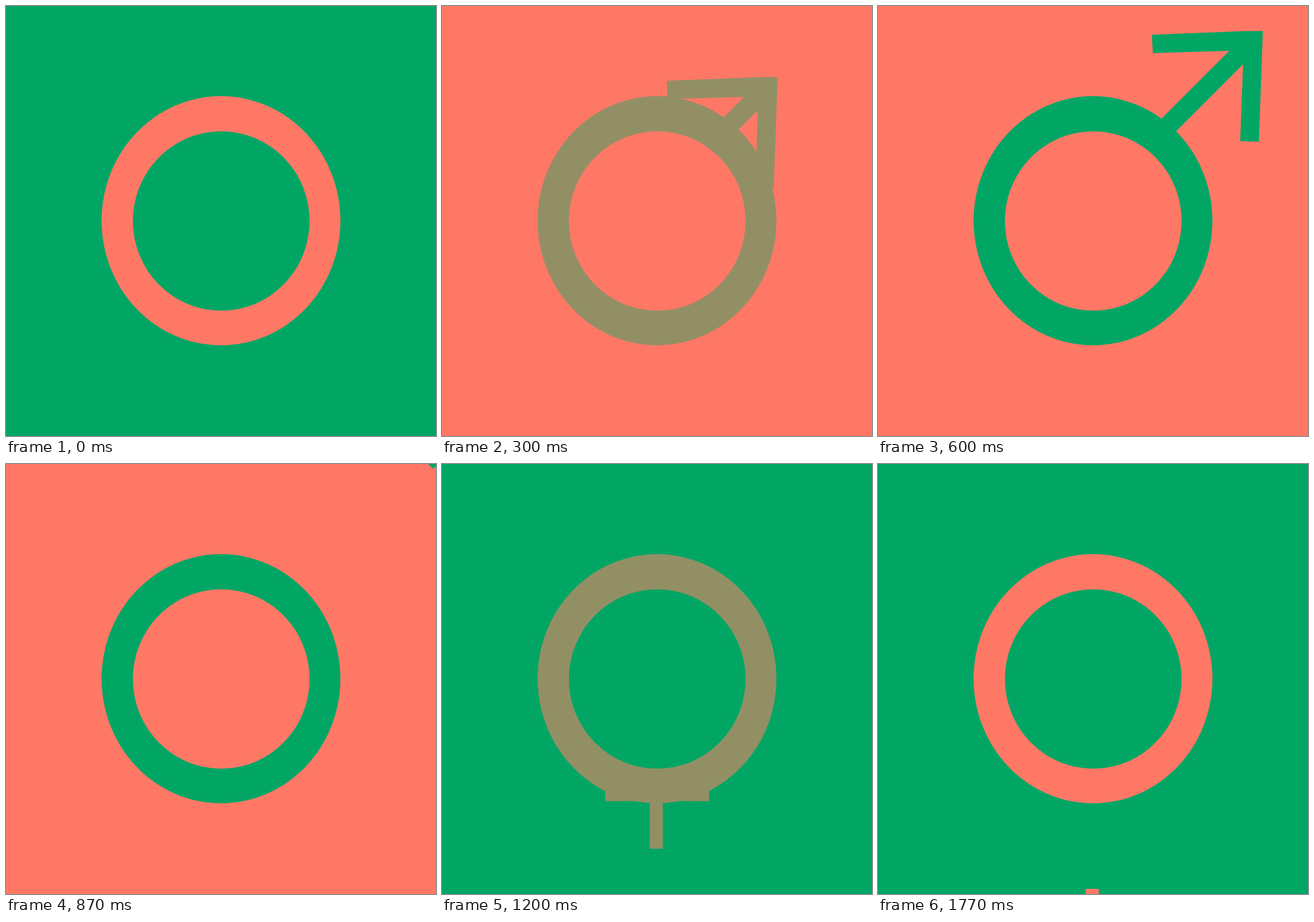
These frames come from a looping animation (748x748 px, 1800 ms). An HTML page:

```html
<!DOCTYPE html>
<html lang="en">
<head>
<meta charset="utf-8">
<title>Symbols</title>
<style>
  html, body { margin: 0; width: 100%; height: 100%; overflow: hidden; }
  svg { display: block; width: 100%; height: 100%; }
</style>
</head>
<body>
<svg viewBox="0 0 748 748">
  <rect id="back" width="748" height="748"/>
  <g id="symbol">
    <path id="arrow" d="M476.5 50 642 43.5H669.5L662.5 236 630 235 635 101.5 480 256.5 456.5 232.5 611 78 478 82Z"/>
    <path id="cross" d="M361.5 545H384V628.5H464.6V649.5H384V732.3H361.5V649.5H284V628.5H361.5Z"/>
    <ellipse cx="374" cy="373.5" rx="207.7" ry="216.7"/>
  </g>
  <ellipse id="hole" cx="374.4" cy="374" rx="153.7" ry="156"/>
</svg>
<script>
  const LOOP = 1800, HALF = 900, STEP = 30, FADE = 600;
  const GREEN = [2, 166, 100], CORAL = [255, 120, 102];
  const MIX_POWER = 1.257;
  const [back, symbol, arrow, cross, hole] =
    ['back', 'symbol', 'arrow', 'cross', 'hole'].map(id => document.getElementById(id));

  const rgb = c => `rgb(${c.map(Math.round)})`;
  const ease = p => (1 - Math.cos(Math.PI * Math.min(p, 1))) / 2;
  const mix = (a, b, p) => a.map((v, i) =>
    (v ** MIX_POWER * (1 - p) + b[i] ** MIX_POWER * p) ** (1 / MIX_POWER));

  function place(shape, visible, x, y) {
    shape.setAttribute('visibility', visible ? 'visible' : 'hidden');
    shape.setAttribute('transform', `translate(${x} ${y})`);
  }

  function draw(time) {
    const t = Math.floor((time % LOOP) / STEP + 0.01) * STEP % LOOP;
    const isArrow = t < HALF;
    const local = t % HALF;
    const [from, to] = isArrow ? [CORAL, GREEN] : [GREEN, CORAL];

    symbol.setAttribute('fill', rgb(mix(from, to, ease(local / FADE))));
    const ground = rgb(local < FADE / 2 ? to : from);
    back.setAttribute('fill', ground);
    hole.setAttribute('fill', ground);

    // Both symbols slide out slowly, then leave at a higher constant speed.
    const late = local - FADE;
    const slow = late < 0;
    place(arrow, isArrow, late * (slow ? 0.285 : 0.974), -late * (slow ? 0.267 : 0.9185));
    place(cross, !isArrow, 0, 15.75 + late * (slow ? 0.2625 : 0.66));
  }

  const start = performance.now();
  function tick() {
    draw(performance.now() - start);
    requestAnimationFrame(tick);
  }
  tick();
</script>
</body>
</html>
```
